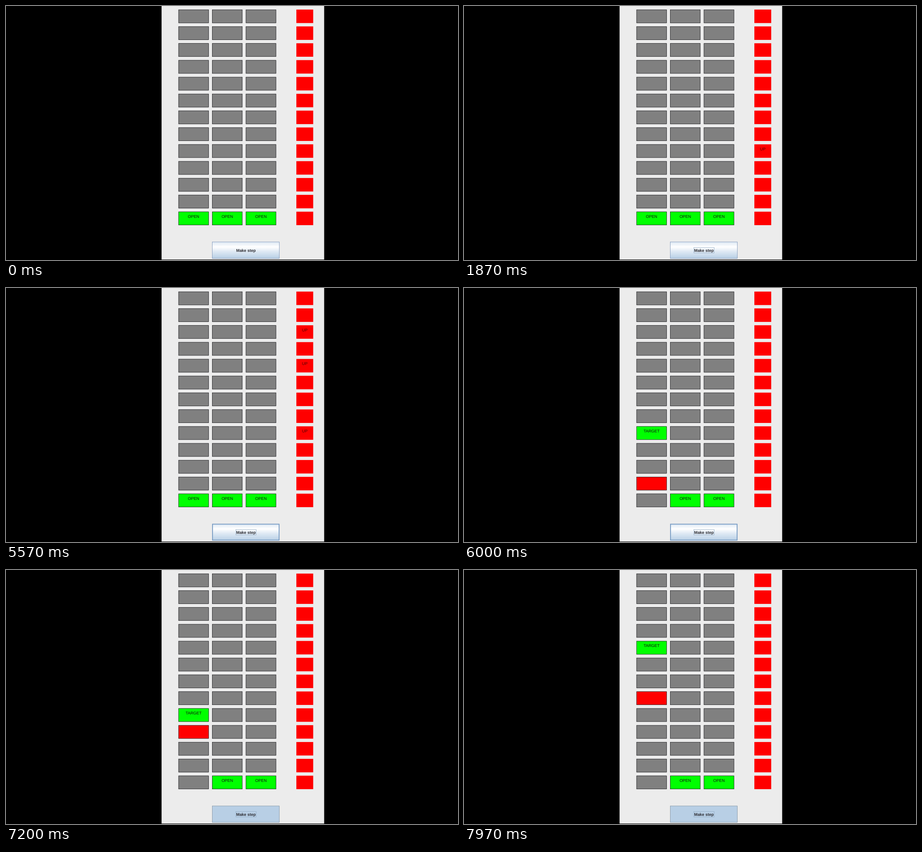
An HTML page for the animation above (8 s loop, 998 by 561 pixels).

```html
<!DOCTYPE html>
<html lang="en">
<head>
<meta charset="utf-8">
<title>Elevator simulation</title>
<style>
  html, body { margin: 0; width: 100%; height: 100%; overflow: hidden; background: #000; }
  svg { display: block; width: 998px; height: 561px; }
  text {
    font: 8.93px "Liberation Sans", Arial, sans-serif;
    text-anchor: middle; text-rendering: geometricPrecision; fill: #101010;
  }
  .line { stroke-width: .744; }
  .cell { stroke: #08080c; }
  .call { fill: #4a0505; }
  .label { font-weight: bold; fill: #2a2a30; }
</style>
</head>
<body>
<svg id="stage" viewBox="0 0 998 561">
  <defs>
    <linearGradient id="ocean" x2="0" y2="1">
      <stop offset="0" stop-color="#dde8f3"/>
      <stop offset=".3" stop-color="#fff"/>
      <stop offset=".6" stop-color="#dde8f3"/>
      <stop offset="1" stop-color="#b8cfe5"/>
    </linearGradient>
  </defs>
  <rect x="343.5" width="359" height="560" fill="#ececec"/>
</svg>
<script>
// The window is laid out in its own units and shown at 74.4 percent.
const SCALE = .744, LEFT = 380.7, TOP = 7.9;
const LOOP = 8000, ROWS = 13;
const GRAY = '#808080', GREEN = '#00ff00', RED = '#ff0000';
const stage = document.getElementById('stage');

function add(tag, attrs, text = '') {
  const node = document.createElementNS('http://www.w3.org/2000/svg', tag);
  for (const key in attrs) node.setAttribute(key, attrs[key]);
  node.textContent = text;
  return stage.appendChild(node);
}

// Box whose one-unit border lies inside its bounds.
const addBox = (x, y, w, h, attrs) => add('rect', {
  x: x + SCALE / 2, y: y + SCALE / 2, width: (w - 1) * SCALE, height: (h - 1) * SCALE, ...attrs
});

const colLeft = col => LEFT + 100 * SCALE * col;
const rowTop = row => TOP + 50 * SCALE * row;

// Each shaft cell is a bordered box with a caption; rows count from the top.
function addCell(col, row) {
  const x = colLeft(col), y = rowTop(row);
  return {
    box: addBox(x, y, 90, 40, { class: 'line cell' }),
    caption: add('text', { x: x + 45 * SCALE, y: y + 18 * SCALE })
  };
}

function addCall(row) {
  const x = colLeft(3.5), y = rowTop(row);
  add('rect', { x, y, width: 50 * SCALE, height: 40 * SCALE, fill: RED });
  return add('text', { class: 'call', x: x + 25 * SCALE, y: y + 18 * SCALE });
}

const rows = [...Array(ROWS).keys()];
const shafts = [0, 1, 2].map(col => rows.map(row => addCell(col, row)));
const calls = rows.map(addCall);

const buttonTop = 520.7;
const button = addBox(colLeft(1), buttonTop, 200, 50, { class: 'line' });
const rollover = addBox(colLeft(1) + SCALE, buttonTop + SCALE, 198, 48, { fill: 'none', stroke: '#7ba0c8', 'stroke-width': 1.5 });
const focus = add('rect', { class: 'line', x: 507.5, y: 533.5, width: 45, height: 12, fill: 'none', stroke: '#8fa8c2' });
add('text', { class: 'label', x: 529.8, y: 542.6 }, 'Make step');

// Every entry overrides part of the state from its time on.
const steps = [
  [0, { lift: 12, target: 12, calls: [], button: 'idle', focus: false }],
  [1470, { focus: true }],
  [1530, { calls: [8] }],
  [3570, { calls: [8, 4] }],
  [4930, { calls: [8, 4, 2] }],
  [5570, { button: 'hover' }],
  ...[
    [5830, 5930, { lift: 11, target: 8, calls: [] }],
    [6330, 6430, { lift: 10 }],
    [6720, 6810, { lift: 9 }],
    [7200, 7290, { lift: 8 }],
    [7580, 7670, { lift: 7, target: 4 }]
  ].flatMap(([press, release, result]) => [
    [press, { button: 'pressed' }],
    [release, { button: 'hover', ...result }]
  ]),
  [7950, { button: 'pressed' }]
];

const stateAt = time => Object.assign({}, ...steps.filter(([at]) => at <= time).map(([, change]) => change));

function cellLook(row, lift, target) {
  if (row === lift) return lift === target ? [GREEN, 'OPEN'] : [RED, ''];
  return row === target ? [GREEN, 'TARGET'] : [GRAY, ''];
}

function draw(state) {
  shafts.forEach((shaft, col) => shaft.forEach((cell, row) => {
    const [fill, caption] = col ? cellLook(row, 12, 12) : cellLook(row, state.lift, state.target);
    cell.box.setAttribute('fill', fill);
    cell.caption.textContent = caption;
  }));
  calls.forEach((call, row) => call.textContent = state.calls.includes(row) ? 'UP' : '');
  const pressed = state.button === 'pressed';
  button.setAttribute('fill', pressed ? '#b8cfe5' : 'url(#ocean)');
  button.setAttribute('stroke', pressed ? '#7a8a99' : '#6f8ab2');
  rollover.style.display = state.button === 'hover' ? '' : 'none';
  focus.style.display = state.focus ? '' : 'none';
}

function tick() {
  draw(stateAt(performance.now() % LOOP));
  requestAnimationFrame(tick);
}
tick();
</script>
</body>
</html>
```
